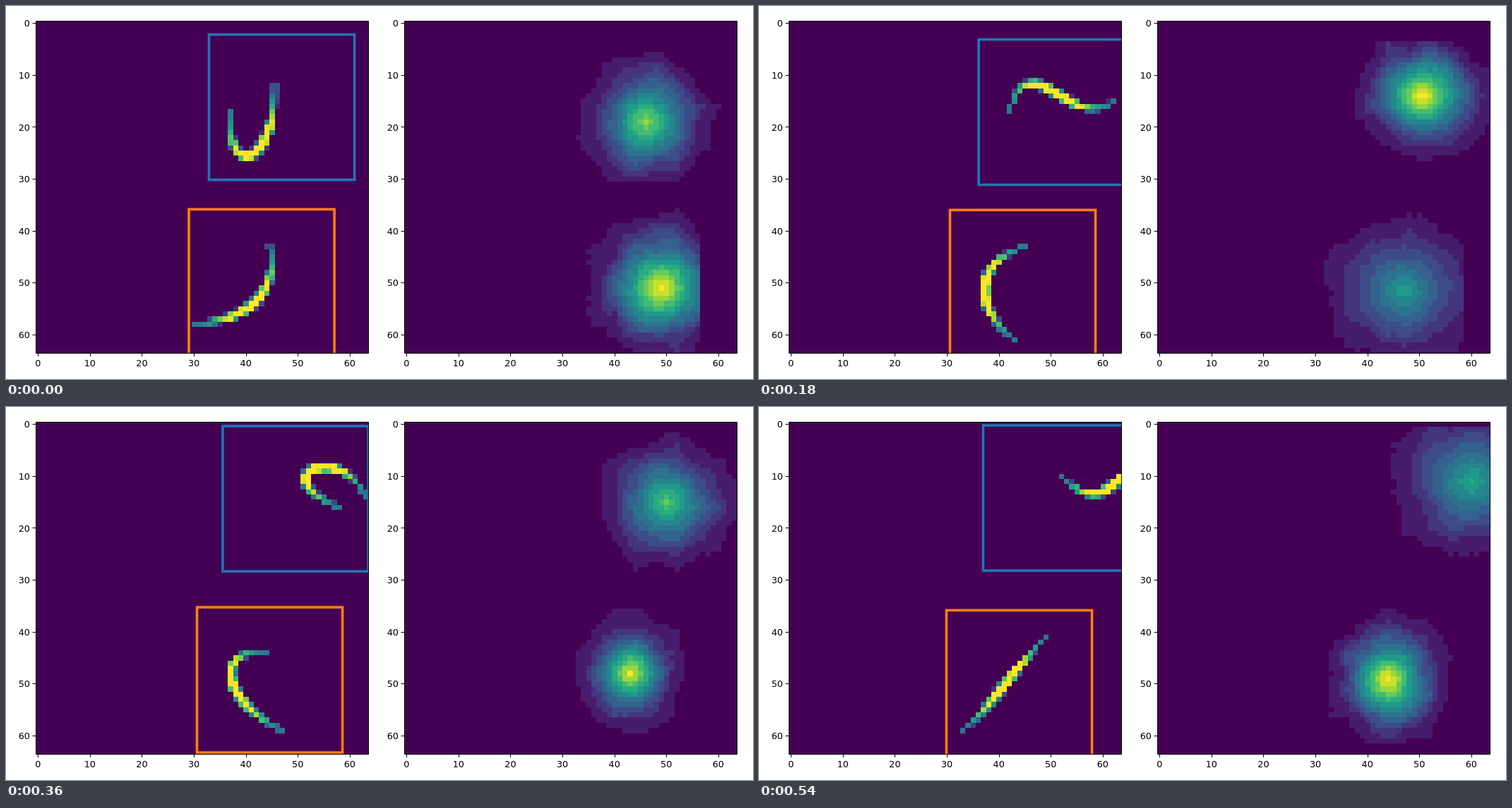
These frames come from a looping animation (1058x529 px, 600 ms). An HTML page with a canvas:

```html
<!DOCTYPE html>
<html lang="en">
<head>
<meta charset="utf-8">
<title>Moving strokes and heat map</title>
<style>
  html, body { margin: 0; width: 100%; height: 100%; overflow: hidden; background: #fff; }
  canvas, svg { position: absolute; left: 0; top: 0; width: 1058px; height: 529px; }
  text { font: 12.8px "DejaVu Sans", sans-serif; fill: #000; }
</style>
</head>
<body>
<canvas id="stage" width="1058" height="529"></canvas>
<svg id="axes" viewBox="0 0 1058 529"></svg>
<script>
const N = 64, SIDE = 471, CELL = SIDE / N, TOP = 21, LEFTS = [42, 564];
const STEP = 60, BOX = 28 * CELL, LEVELS = 13;
const COLORS = ["#1f77b4", "#ff7f0e"];
const ctx = document.getElementById("stage").getContext("2d");

const viridis = "440154 482878 3e4a89 31688e 26828e 1f9e89 35b779 6dcd59 b4de2c fde725"
  .split(" ").map(h => [0, 2, 4].map(i => parseInt(h.substr(i, 2), 16)));

const lerp = (a, b, k) => a + (b - a) * k;

function shade(v) {
  const p = Math.max(0, Math.min(1, v)) * 9, i = Math.min(8, Math.floor(p));
  return `rgb(${viridis[i].map((c, n) => Math.round(lerp(c, viridis[i + 1][n], p - i)))})`;
}

function random(x, y, seed) {
  const s = Math.sin(x * 12.99 + y * 78.23 + seed * 37.7) * 43758.55;
  return s - Math.floor(s);
}

// Smooth seeded noise on a coarse lattice
function noise(x, y, seed) {
  const i = Math.floor(x), j = Math.floor(y);
  const row = n => lerp(random(i, n, seed), random(i + 1, n, seed), x - i);
  return lerp(row(j), row(j + 1), y - j);
}

// box: corner in pixels; curve: cubic Bezier in cells; cloud: x, y, two radii, peak
const part = (box, curve, cloud) => ({ box, curve, cloud });

const hook = [
  part([287.5, 40.5], [37, 17, 36, 30, 45.5, 28, 45.5, 12], [46, 19, 14.5, 14.5, 0.85]),
  part([259, 288.3], [30, 58, 42, 57, 46, 51, 44.5, 43], [49, 51, 16, 16, 1.05])
];
const ess = [
  part([297, 30.5], [38, 23, 54, 24, 39, 6, 52, 6], [47, 12, 12.5, 14, 0.75]),
  part([258.5, 283], [31, 50, 36, 58, 49, 58, 45, 45], [42, 48, 13, 14, 1.05])
];
const wave = [
  part([311.2, 47.5], [42, 17, 46, 3, 54, 21.5, 62, 15], [50.5, 14, 15, 14, 1.1]),
  part([270.5, 289.3], [45, 43, 35, 46, 35, 55, 43, 61], [47, 51.5, 17, 16, 0.55])
];
const rise = [
  part([306, 22], [46, 15, 62, 22, 53, 4, 63, 4], [54, 11, 16, 17, 0.62]),
  part([276, 287.5], [31, 55, 40, 56, 46, 51, 47, 42], [45, 45, 14, 13, 1.1])
];
const arch = [
  part([307, 27], [58, 16, 43, 10, 58, 3, 63, 14], [50, 15, 15, 14, 0.75]),
  part([270.5, 284], [44, 44, 33, 43, 36, 54, 47, 59], [43, 48, 11.5, 13, 1])
];
const cup = [
  part([312.2, 27], [58, 5, 52, 18, 63, 20, 62.5, 3], [59.5, 14, 13, 22, 1]),
  part([284, 288.3], [32, 47, 39, 55.4, 52, 55.4, 45.5, 45], [51, 55.5, 17, 18, 0.95])
];
const slash = [
  part([317.5, 26], [52, 10, 59, 17, 62, 12, 69, 4], [60, 11, 17, 17, 0.6]),
  part([265.5, 288.3], [33, 59, 39, 54, 42, 48, 49, 41], [44, 49, 13.5, 14.5, 1.08])
];

const middle = (a, b) => a.map((p, i) => part(...["box", "curve", "cloud"].map(
  key => p[key].map((v, n) => (v + b[i][key][n]) / 2))));

const scenes = [hook, ess, middle(ess, wave), wave, middle(wave, rise), rise, arch,
  middle(arch, cup), cup, slash];

function bezier(c, t) {
  const u = 1 - t, k = [u * u * u, 3 * u * u * t, 3 * u * t * t, t * t * t];
  return [0, 1].map(n => k.reduce((sum, w, i) => sum + w * c[2 * i + n], 0));
}

// A pen line that is thin and dim at both ends, thick and bright midway
function drawStroke(grid, curve) {
  const count = 160, pts = Array.from({ length: count + 1 }, (_, i) => bezier(curve, i / count));
  const run = [0];
  for (let i = 1; i <= count; i++)
    run.push(run[i - 1] + Math.hypot(pts[i][0] - pts[i - 1][0], pts[i][1] - pts[i - 1][1]));
  pts.forEach(([px, py], i) => {
    const weight = 0.4 + 0.95 * Math.sin(Math.PI * run[i] / run[count]) ** 2;
    const cx = Math.round(px), cy = Math.round(py);
    for (let y = Math.max(0, cy - 1); y <= Math.min(N - 1, cy + 1); y++)
      for (let x = Math.max(0, cx - 1); x <= Math.min(N - 1, cx + 1); x++) {
        const v = weight - 1.58 * Math.max(0, Math.hypot(x - px, y - py) - 0.4);
        if (v > 0.1) grid[y * N + x] = Math.max(grid[y * N + x], v);
      }
  });
}

// A ragged cone of heat, cut off by its box and rounded to a few levels
function drawCloud(grid, left, [bx, by], [cx, cy, rx, ry, peak]) {
  const x0 = (bx - left) / CELL - 0.5, y0 = (by - TOP) / CELL - 0.5;
  const seed = cx + cy, power = 1 + 0.6 * peak;
  for (let y = Math.max(0, Math.ceil(y0)); y <= Math.min(N - 1, y0 + 28); y++)
    for (let x = Math.max(0, Math.ceil(x0)); x <= Math.min(N - 1, x0 + 28); x++) {
      const ragged = 0.87 + 0.26 * noise(x / 4, y / 4, seed) + 0.05 * random(x, y, seed);
      const d = Math.hypot((x - cx) / rx, (y - cy) / ry) * ragged;
      const v = peak * Math.max(0, 1 - d) ** power;
      const level = v > 0.02 ? Math.max(1, Math.round(v * LEVELS)) / LEVELS : 0;
      grid[y * N + x] = Math.max(grid[y * N + x], level);
    }
}

function paint(grid, left) {
  const edge = (start, i) => Math.round(start + i * CELL);
  ctx.fillStyle = shade(0);
  ctx.fillRect(left, TOP, SIDE, SIDE);
  grid.forEach((v, i) => {
    if (v <= 0) return;
    const x = i % N, y = Math.floor(i / N), px = edge(left, x), py = edge(TOP, y);
    ctx.fillStyle = shade(v);
    ctx.fillRect(px, py, edge(left, x + 1) - px, edge(TOP, y + 1) - py);
  });
}

function draw(parts) {
  const strokes = new Float32Array(N * N), heat = new Float32Array(N * N);
  for (const { box, curve, cloud } of parts) {
    drawStroke(strokes, curve);
    drawCloud(heat, LEFTS[0], box, cloud);
  }
  ctx.fillStyle = "#fff";
  ctx.fillRect(0, 0, 1058, 529);
  paint(strokes, LEFTS[0]);
  paint(heat, LEFTS[1]);
  ctx.save();
  ctx.beginPath();
  ctx.rect(LEFTS[0], TOP, SIDE, SIDE);
  ctx.clip();
  ctx.lineWidth = 3.6;
  parts.forEach(({ box }, i) => {
    ctx.strokeStyle = COLORS[i];
    ctx.strokeRect(...box, BOX, BOX);
  });
  ctx.restore();
}

function drawAxes() {
  let marks = "", labels = "";
  for (const left of LEFTS) {
    marks += `M${left + 0.5} ${TOP + 0.5}h${SIDE}v${SIDE}h-${SIDE}z`;
    for (let n = 0; n <= 60; n += 10) {
      const x = left + (n + 0.5) * CELL, y = TOP + (n + 0.5) * CELL;
      marks += `M${Math.floor(x) + 0.5} 492.5v4.5M${left} ${Math.floor(y) + 0.5}h-4.5`;
      labels += `<text x="${x - 0.4}" y="510.7" text-anchor="middle">${n}</text>` +
        `<text x="${left - 8}" y="${y + 4.8}" text-anchor="end">${n}</text>`;
    }
  }
  document.getElementById("axes").innerHTML =
    `<path d="${marks}" fill="none" stroke="#000"/>${labels}`;
}

const start = performance.now();
let shown = -1;

function tick() {
  const step = Math.floor((performance.now() - start) / STEP) % scenes.length;
  if (step !== shown) draw(scenes[shown = step]);
  requestAnimationFrame(tick);
}

drawAxes();
tick();
</script>
</body>
</html>
```
